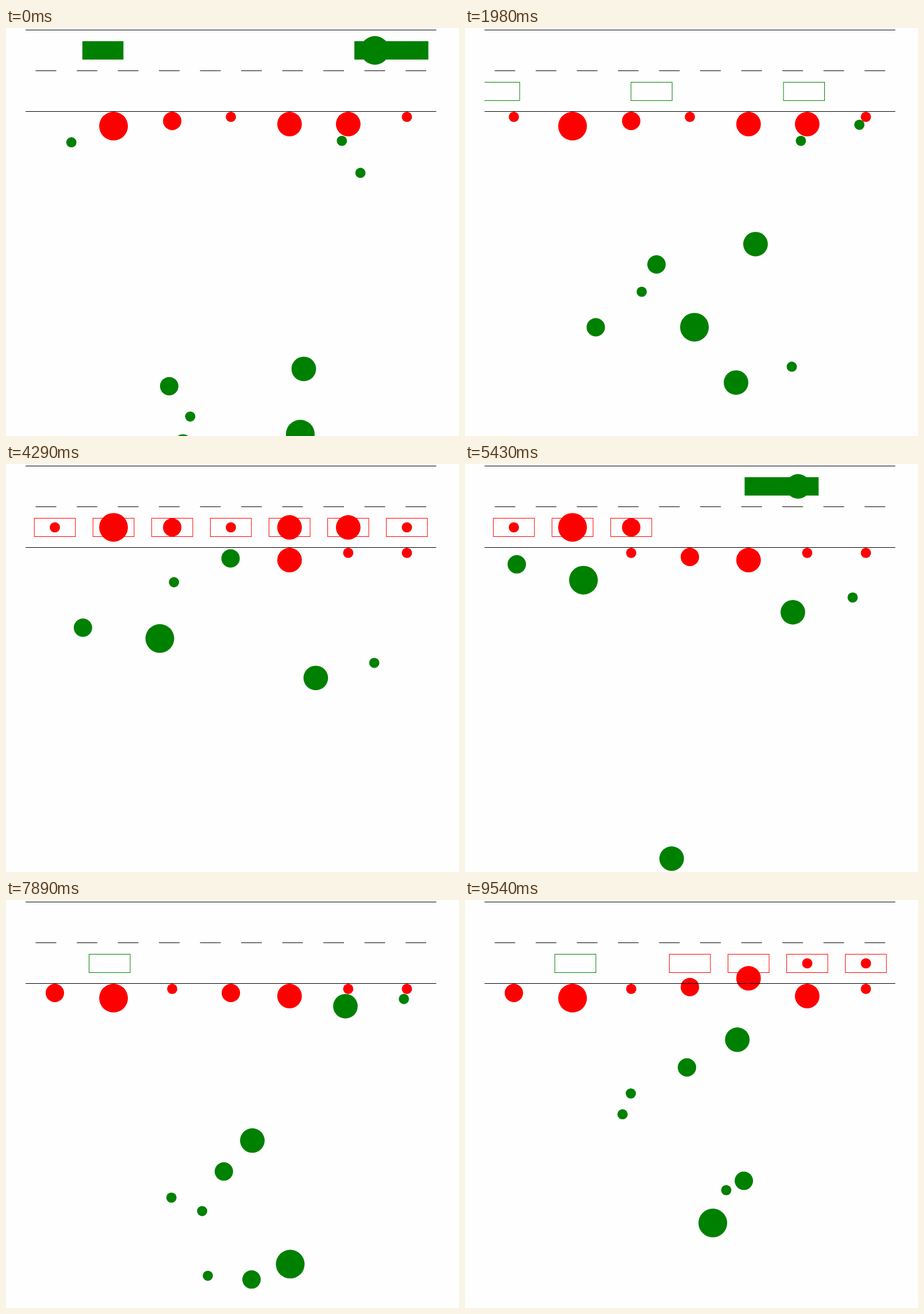
Write an HTML page with a canvas that moves like this. It is 788 by 711 pixels and loops after 9640 ms.

```html
<!DOCTYPE html>
<html>
<head>
<meta charset="utf-8">
<title>Taxi rank</title>
<style>
html, body { margin: 0; width: 100%; height: 100%; overflow: hidden; background: #fefefe; }
canvas { display: block; }
</style>
</head>
<body>
<canvas id="stage" width="788" height="711"></canvas>
<script>
const ctx = document.getElementById('stage').getContext('2d');
const W = 788, H = 711, LOOP = 9640, DT = 30, WARM_UP = 6000;
const LEFT = 34, ROAD_W = 714.5, KERB = 146, LANE_OUT = 39, LANE_IN = 110.4;
const CAR_W = 71.5, CAR_H = 32, SLOTS = 7;
const WALK = .11, BOARD = .086, DRIVE = .65;   // px per ms
const ROUND = 6540, CAR_GAP = 408, FIRST_CAR = 1070, SPACE = 20;
const RADIUS = { S: 8.9, M: 16, L: 21.4, X: 25 };

// Everyone in order of arrival; slots are filled from right to left.
const SIZES = 'SSSSMXS' + 'SLLSMXS' + 'SSLMSXM' + 'SLLMSSX' + 'SM';
// Where and when the last ones step onto the stage: [ms, x]
const ENTRIES = [
  [-5610, 451], [-5490, 229], [-5300, 446], [-1245, 526], [-940, 260], [-380, 323],
  [-280, 529], [-25, 309], [760, 530], [920, 440], [4965, 348], [5610, 369],
  [6090, 287], [6180, 412], [6671, 584], [7180, 306], [7275, 405]];

const people = [...SIZES].map((size, k) => {
  const r = RADIUS[size], n = k % SLOTS, round = Math.floor(k / SLOTS);
  const slotX = 85 + 102.06 * (SLOTS - 1 - n), slotY = KERB + r;
  const carEnters = FIRST_CAR + ROUND * (round - 1) + CAR_GAP * n;
  const park = carEnters + (slotX - LEFT + CAR_W / 2) / DRIVE;
  const leave = park + 2600 - 170 * round + (n % 2 ? -160 : 160);
  const entry = ENTRIES[k - SIZES.length + ENTRIES.length];
  const [start, x, y] = entry ? [...entry, H + r] : [-Infinity, slotX, slotY];
  return { r, slotX, slotY, park, leave, start, x, y, waiting: !entry };
});

// Walkers queue behind those at the kerb and give way to smaller walkers.
function blocked(p, dx, dy, t) {
  return people.some(q => {
    if (q === p || t < q.start || !(q.waiting || q.r < p.r)) return false;
    const qx = q.x - p.x, qy = q.y - p.y;
    const ahead = qx * dx + qy * dy > 0;
    return ahead && Math.hypot(qx, qy) < p.r + q.r + (q.waiting ? 1 : SPACE);
  });
}

function move(p, t) {
  if (t < p.start) return;
  if (p.waiting) {
    if (t > p.park) p.y = Math.max(LANE_IN, p.y - BOARD * DT);
    return;
  }
  const dx = p.slotX - p.x, dy = p.slotY - p.y, dist = Math.hypot(dx, dy), step = WALK * DT;
  if (dist <= step) {
    Object.assign(p, { x: p.slotX, y: p.slotY, waiting: true });
  } else if (!blocked(p, dx, dy, t)) {
    p.x += dx / dist * step;
    p.y += dy / dist * step;
  }
}

const history = [];
for (let t = -WARM_UP; t < LOOP; t += DT) {
  for (const p of people) move(p, t);
  if (t >= 0) history.push(people.map(p => ({ ...p })));
}

// The picture is refreshed in slightly uneven steps: [step, ms]
const PACE = [[0, 0], [15, 1980], [22, 2850], [33, 4290], [48, 6360], [60, 7890], [72, 9540]];
const ticks = [0];
PACE.slice(1).forEach(([b, tb], i) => {
  const [a, ta] = PACE[i];
  for (let k = a + 1; k <= b; k++) ticks.push(Math.floor((ta + (tb - ta) * (k - a) / (b - a)) / DT) * DT);
});

const carX = (p, t) => p.slotX + DRIVE * (Math.max(0, t - p.leave) - Math.max(0, p.park - t));

function drawCar(p, t) {
  const x = carX(p, t) - CAR_W / 2;
  if (t >= p.leave) {
    ctx.fillStyle = 'green';
    ctx.fillRect(x, LANE_OUT - CAR_H / 2, CAR_W, CAR_H);
  } else {
    ctx.strokeStyle = t < p.park ? 'green' : 'red';
    ctx.strokeRect(x, 94.5, CAR_W, CAR_H);
  }
}

function drawPerson(p, t) {
  if (t < p.start) return;
  const riding = t >= p.leave;
  ctx.fillStyle = p.waiting && !riding ? 'red' : 'green';
  ctx.beginPath();
  ctx.arc(riding ? carX(p, t) : p.x, riding ? LANE_OUT : p.y, p.r, 0, 2 * Math.PI);
  ctx.fill();
}

function drawRoad() {
  ctx.fillStyle = 'black';
  for (const y of [3, 145]) ctx.fillRect(LEFT, y, ROAD_W, 1);
  for (let i = 0; i < 10; i++) ctx.fillRect(51.5 + 71.5 * i, 74, 36, 1);
}

function draw(t) {
  const crowd = history[t / DT];
  ctx.fillStyle = '#fefefe';
  ctx.fillRect(0, 0, W, H);
  ctx.save();
  ctx.beginPath();
  ctx.rect(LEFT, 0, ROAD_W, H);
  ctx.clip();
  for (const p of crowd) drawCar(p, t);
  for (const p of crowd) drawPerson(p, t);
  ctx.restore();
  drawRoad();
}

const begin = performance.now();
function frame() {
  const t = (performance.now() - begin) % LOOP;
  draw(ticks.filter(k => k <= t).pop() || 0);
  requestAnimationFrame(frame);
}
frame();
</script>
</body>
</html>
```
